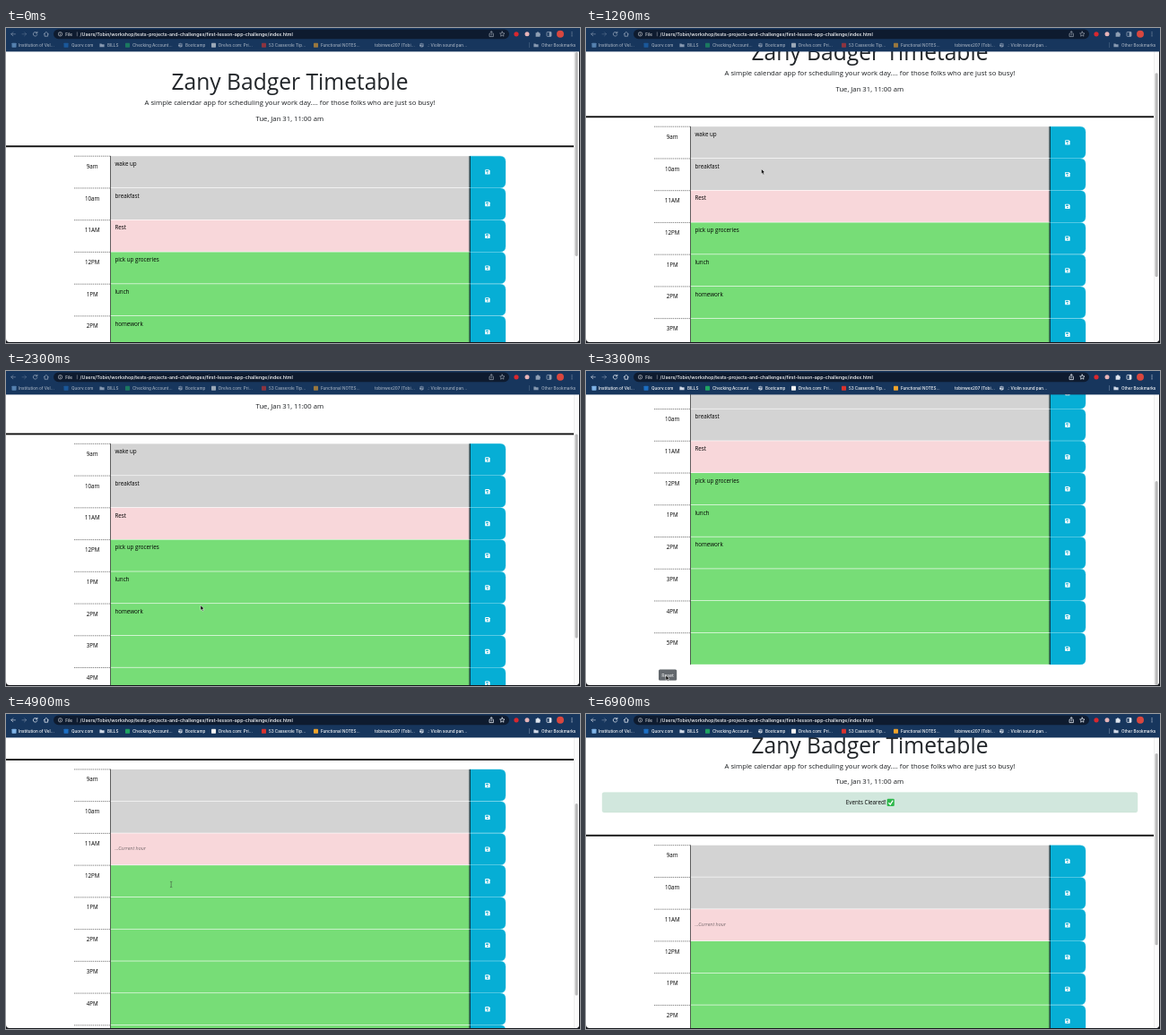
An HTML page that plays this animation: 640x352 px, repeating every 7000 ms.

```html
<!DOCTYPE html>
<html lang="en">
<head>
<meta charset="utf-8">
<title>Day planner</title>
<style>
  html, body { margin: 0; width: 100%; height: 100%; overflow: hidden; background: #15171c; }
  svg { display: block; width: 100%; height: 100%; }
  text { white-space: pre; }
  .page text { font-family: "Open Sans", "Noto Sans", sans-serif; font-size: 6.25px; fill: #000; }
  .page .mid { text-anchor: middle; }
  .page .title { font-size: 24.6px; fill: #212529; }
  .page .lead { font-size: 7.69px; fill: #1a1d20; }
  .page .hint { font-size: 5.4px; font-style: italic; fill: #75696c; }
  .page .reset { font-size: 5.4px; fill: #fff; }
  .bar text { font-family: Inter, Roboto, sans-serif; font-size: 4.6px; font-weight: 500; fill: #fff; }
  .bar .url { font-size: 5.3px; }
  .bar .line { fill: none; stroke: #dfe5ee; stroke-width: .8; stroke-linecap: round; stroke-linejoin: round; }
  .dimmable { opacity: .6; }
  .focused .dimmable { opacity: 1; }
  #reset { fill: #6c757d; }
  .focused #reset { fill: #63686d; }
  .cleared #reset { fill: #565e64; }
  .alert, .hint, .ring { display: none; }
  .cleared .alert, .cleared .hint, .cleared .ring { display: inline; }
  .cleared .entry { display: none; }
</style>
</head>
<body>
<svg id="stage" viewBox="0 0 640 352" xmlns="http://www.w3.org/2000/svg">
  <defs>
    <clipPath id="view"><path d="M0 26H639V347Q639 351 635 351H4Q0 351 0 347Z"/></clipPath>
    <linearGradient id="shade">
      <stop offset="0" stop-color="#000" stop-opacity="0"/>
      <stop offset="1" stop-color="#000" stop-opacity=".3"/>
    </linearGradient>
    <g id="disk">
      <path d="M-2.7 -2.1Q-2.7 -2.7 -2.1 -2.7H1.5L2.7 -1.5V2.1Q2.7 2.7 2.1 2.7H-2.1Q-2.7 2.7 -2.7 2.1Z" fill="#fff"/>
      <path d="M-1.8 -1.8H1V-.4H-1.8Z" fill="#06aed5"/>
      <circle cy="1.1" r=".8" fill="#06aed5"/>
    </g>
    <path id="folder" d="M-2.6 -1.7H-.6L.1 -1H2.6V2H-2.6Z" fill="#cfd8e6"/>
    <g id="globe">
      <circle r="2.4" fill="#d5dce7"/>
      <path d="M-2 -.7L0 -1.4L.4 .2L-.7 1.7M1 -1.8L1.9 .5" fill="none" stroke="#17365d" stroke-width=".7"/>
    </g>
  </defs>

  <g class="page" clip-path="url(#view)">
    <rect y="26" width="640" height="326" fill="#fff"/>
    <g id="doc">
      <text class="title mid" x="316.5" y="69">Zany Badger Timetable</text>
      <text class="lead mid" x="316.5" y="86.2">A simple calendar app for scheduling your work day.... for those folks who are just so busy!</text>
      <text class="lead mid" x="316.3" y="103.5">Tue, Jan 31, 11:00 am</text>
      <g class="alert">
        <rect x="18.2" y="113.2" width="596.6" height="22.2" rx="1.8" fill="#d1e7dd" stroke="#c3dfd1" stroke-width=".45"/>
        <text x="289.8" y="126.7">Events Cleared!</text>
        <rect x="335.6" y="120.3" width="8.2" height="8.2" rx="1.3" fill="#2fb84c"/>
        <path d="M337.4 124.6L339.2 126.6L342.2 122.2" fill="none" stroke="#fff" stroke-width="1.3"/>
      </g>
      <g id="main">
        <rect y="131.3" width="633" height="1.9" fill="#111"/>
        <g id="rows"></g>
        <rect class="ring" x="79.9" y="468.9" width="22.4" height="14.4" rx="2.6" fill="#b5b8bb"/>
        <rect id="reset" x="81" y="470" width="20.2" height="12.2" rx="1.5"/>
        <text class="reset mid" x="91.1" y="478.2">Reset</text>
      </g>
    </g>
    <rect x="633" y="26" width="6" height="326" fill="#fafafa"/>
    <rect x="633" y="26" width=".5" height="326" fill="#e4e4e4"/>
    <rect id="thumb" x="634.5" y="27" width="3.2" rx="1.6" fill="#b9b9b9"/>
  </g>

  <g class="bar">
    <rect width="640" height="26.4" fill="#17365d"/>
    <rect x="53" y="1.4" width="508" height="10.8" rx="5.4" fill="#0e1b2f"/>
    <g class="dimmable">
      <g class="line">
        <path d="M10.4 6.8H5.8M7.8 4.8L5.8 6.8L7.8 8.8" opacity=".75"/>
        <path d="M18 6.8H22.6M20.6 4.8L22.6 6.8L20.6 8.8" opacity=".4"/>
        <path d="M34.6 5.6A2.3 2.3 0 1 0 34.8 7.6M34.9 4.2V5.8H33.3"/>
        <path d="M42.2 6.8L44.8 4.4L47.4 6.8M43 6.4V9.2H46.6V6.4"/>
        <path d="M539.6 6.2H539V9.6H543.4V6.2H542.8M541.2 8V3.8M540 4.9L541.2 3.7L542.4 4.9"/>
        <path d="M553.3 4L554.1 5.8L556 6L554.6 7.3L555 9.2L553.3 8.2L551.6 9.2L552 7.3L550.6 6L552.5 5.8Z"/>
      </g>
      <path d="M590.6 5.2H592A1 1 0 0 1 594 5.2H595.4V6.6A1 1 0 0 1 595.4 8.4V9.8H590.6Z" fill="#dfe5ee"/>
      <rect x="603" y="4.4" width="5" height="5" rx=".8" fill="none" stroke="#dfe5ee" stroke-width=".8"/>
      <rect x="605.6" y="4.4" width="2.4" height="5" fill="#dfe5ee"/>
      <g fill="#dfe5ee"><circle cx="631" cy="4.8" r=".6"/><circle cx="631" cy="6.8" r=".6"/><circle cx="631" cy="8.8" r=".6"/></g>
    </g>
    <circle cx="569" cy="6.8" r="2.6" fill="#d9272e"/>
    <circle cx="581" cy="6.8" r="2.5" fill="#e8b4b8"/>
    <circle cx="618" cy="6.8" r="4" fill="#d8473f"/>
    <g opacity=".85">
      <circle cx="60.5" cy="6.8" r="2.2" fill="none" stroke="#fff" stroke-width=".6"/>
      <path d="M60.5 6.5V8M60.5 5.4V5.8" stroke="#fff" stroke-width=".6"/>
      <text x="66.3" y="8.5">File</text>
      <path d="M79.3 4.4V9.2" stroke="#fff" stroke-width=".4"/>
    </g>
    <text class="url" x="82.6" y="8.6">/Users/Tobin/workshop/tests-projects-and-challenges/first-lesson-app-challenge/index.html</text>
    <g id="marks" class="dimmable">
      <path d="M583.5 16V22" stroke="#9fb0c8" stroke-width=".4"/>
    </g>
  </g>

  <g id="cursor">
    <path id="arrow" d="M0 0V5.6L1.3 4.4L2.2 6.4L3.2 6L2.3 4H4.1Z" fill="#000" stroke="#fff" stroke-width=".5"/>
    <path id="beam" d="M-1.2 -3.2Q0 -3.2 0 -2.4Q0 -3.2 1.2 -3.2M0 -2.4V2.4M-1.2 3.2Q0 3.2 0 2.4Q0 3.2 1.2 3.2" fill="none" stroke="#3d4a3d" stroke-width=".55"/>
  </g>
</svg>
<script>
const LOOP = 7000, STEP = 100;
const FOCUS = 3200, CLEAR = 3500;
const ROW = 35.74, TOP = 143, ALERT = 29;
const VIEW = 325, HEIGHT = 461.4;
const $ = id => document.getElementById(id);

const hours = ["9am", "10am", "11AM", "12PM", "1PM", "2PM", "3PM", "4PM", "5PM"];
const events = ["wake up", "breakfast", "Rest", "pick up groceries", "lunch", "homework"];
const NOW = 2;
const fillOf = i => i < NOW ? "#d3d3d3" : i === NOW ? "#f8d7da" : "#77dd77";

function row(hour, i) {
  const note = events[i] ? `<text class="entry" x="121.4" y="11">${events[i]}</text>` : "";
  const hint = i === NOW ? `<text class="hint" x="121.4" y="19.1">...Current hour</text>` : "";
  return `<g transform="translate(0 ${TOP + i * ROW})">
    <path d="M76 .2H116.5" stroke="#333" stroke-width=".6" stroke-dasharray="1.4 .9"/>
    <text class="mid" x="96.2" y="13.8">${hour}</text>
    <rect x="116.5" y=".2" width="400.5" height="35.1" fill="${fillOf(i)}"/>
    <rect x="515" y=".2" width="2" height="35.1" fill="url(#shade)"/>
    <path d="M116.5 0V${ROW}" stroke="#222" stroke-width=".7"/>
    <path d="M517 .2H551Q557 .2 557 6.2V29.4Q557 35.4 551 35.4H517Z" fill="#06aed5" stroke="#06aed5" stroke-opacity=".35" stroke-width=".9"/>
    <path d="M517.3 .2V35.4" stroke="#1a1f22" stroke-width="1"/>
    <use href="#disk" x="536.9" y="17.9"/>${note}${hint}</g>`;
}
$("rows").innerHTML = hours.map(row).join("");

// icon x, label x, icon (colour or symbol), label
const marks = [
  [9, 14, "#7fb2e5", "Institution of Vel..."],
  [67, 73, "#1c6fc4", "Quorv.com"],
  [107, 113, "folder", "BILLS"],
  [135.5, 141, "#1fa463", "Checking Account..."],
  [194.5, 200, "globe", "Bootcamp"],
  [231.5, 237, "#f4f4f4", "Drelvo.com: Pri..."],
  [287.5, 293, "#d9332e", "53 Casserole Tip..."],
  [345.5, 351, "#f0a32b", "Functional NOTES..."],
  [0, 411, "", "tobinwex207 (Tobi..."],
  [463.5, 469.5, "globe", ".: Violin sound pan..."],
  [591, 597, "folder", "Other Bookmarks"]
];
function mark([ix, x, icon, label]) {
  const pic = !icon ? "" : icon[0] === "#"
    ? `<rect x="${ix - 2.5}" y="16.7" width="5" height="5" rx=".6" fill="${icon}"/>`
    : `<use href="#${icon}" x="${ix}" y="19.2"/>`;
  return `${pic}<text x="${x}" y="20.9">${label}</text>`;
}
$("marks").innerHTML += marks.map(mark).join("");

// time, value
const scrollKeys = [
  [200, 0], [1000, 33], [1400, 33], [1800, 37], [2100, 37], [2900, 136.4],
  [CLEAR - 1, 136.4], [CLEAR, 136.4 + ALERT], [4400, 136.4 + ALERT], [4700, 152.7], [5300, 25.5]
];
// time, x, y
const cursorKeys = [
  [600, 168, 112], [1200, 195.5, 157.5], [2100, 253.5, 239.5], [3000, 89, 340], [4100, 89, 340],
  [4700, 150.3, 225.3], [5400, 268.8, 103.3], [5900, 268.8, 103.3], [6500, 300, 9]
];

function sample(keys, t) {
  const n = keys.findIndex(k => k[0] > t);
  if (n === 0) return keys[0].slice(1);
  if (n < 0) return keys[keys.length - 1].slice(1);
  const a = keys[n - 1], b = keys[n];
  const p = (t - a[0]) / (b[0] - a[0]);
  return a.slice(1).map((v, i) => v + (b[i + 1] - v) * p);
}

function draw() {
  const t = Math.floor(performance.now() % LOOP / STEP) * STEP;
  const cleared = t >= CLEAR, focused = t >= FOCUS;
  const shift = cleared ? ALERT : 0, height = HEIGHT + shift;
  const [scroll] = sample(scrollKeys, t);
  const [x, y] = sample(cursorKeys, t);
  $("stage").classList.toggle("cleared", cleared);
  $("stage").classList.toggle("focused", focused);
  $("doc").setAttribute("transform", `translate(0 ${-scroll})`);
  $("main").setAttribute("transform", `translate(0 ${shift})`);
  $("thumb").setAttribute("y", 27 + scroll * VIEW / height);
  $("thumb").setAttribute("height", VIEW * VIEW / height - 1);

  const top = TOP + shift - scroll;
  const typing = focused && x > 117 && x < 517 && y > top && y < top + 9 * ROW;
  $("cursor").setAttribute("transform", `translate(${x} ${y})`);
  $("cursor").style.display = t >= 600 && t < 6500 ? "" : "none";
  $("arrow").style.display = typing ? "none" : "";
  $("beam").style.display = typing ? "" : "none";
  requestAnimationFrame(draw);
}
draw();
</script>
</body>
</html>
```
